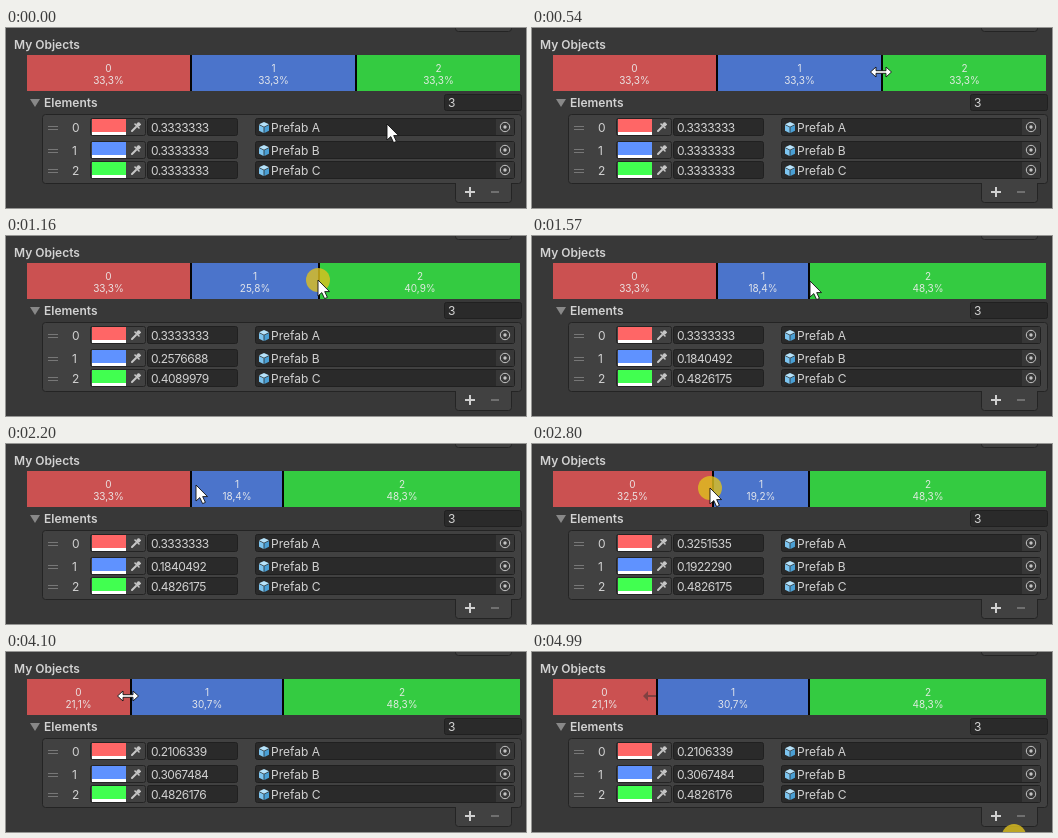
Recreate the animation shown at these times as an HTML page. Size 520x180 px, loop 5060 ms.

```html
<!DOCTYPE html>
<html lang="en">
<head>
<meta charset="utf-8">
<title>Weighted list</title>
<style>
  html, body { margin: 0; width: 100%; height: 100%; overflow: hidden; background: #383838; }
  svg { display: block; width: 520px; height: 180px; }
  text { font: 12px Inter, sans-serif; fill: #d2d2d2; white-space: pre; }
  .title { font-weight: 600; }
  .share { font-size: 10px; fill: #eee; fill-opacity: .92; text-anchor: middle; }
  .number { letter-spacing: -.5px; }
  .field { fill: #2a2a2a; stroke: #202020; }
  .panel { fill: #414141; stroke: #242424; }
  .pointer { fill: #fff; stroke: #111; stroke-width: .9; stroke-linejoin: round; }
</style>
</head>
<body>
<svg id="stage" viewBox="0 0 520 180"></svg>
<script>
const LOOP = 5060, STEP = 70;
const BAR = { left: 21, top: 27, height: 36, room: 489, gap: 2 };
const rows = [
  { y: 99, bar: '#cb5151', swatch: '#ff6666', name: 'Prefab A' },
  { y: 122, bar: '#4b74cb', swatch: '#5f92ff', name: 'Prefab B' },
  { y: 142, bar: '#34cb41', swatch: '#41ff50', name: 'Prefab C' },
];

const box = (x, y, w, h, cls, r = 2) =>
  `<rect x="${x + .5}" y="${y + .5}" width="${w - 1}" height="${h - 1}" rx="${r}" class="${cls}"/>`;
const fill = (x, y, w, h, color) =>
  `<rect x="${x}" y="${y}" width="${w}" height="${h}" fill="${color}"/>`;
const label = (x, y, value, cls = '') => `<text x="${x}" y="${y}" class="${cls}">${value}</text>`;

const segment = row => `<g class="segment">
  <rect y="${BAR.top}" height="${BAR.height}" fill="${row.bar}"/>
  <text class="share" y="44">${rows.indexOf(row)}</text>
  <text class="share" y="56"></text></g>`;

const listRow = (row, i) => {
  const top = row.y - 9;
  return fill(42, row.y - 1, 10, 1, '#777') + fill(42, row.y + 2, 10, 1, '#777')
    + label(66, row.y + 5, i)
    + box(84, top, 56, 18, 'panel')
    + fill(86, top + 1, 34, 13, row.swatch) + fill(86, top + 14, 34, 3, '#fff')
    + `<g transform="translate(130 ${row.y})" stroke="#c8c8c8" fill="#c8c8c8" stroke-linecap="round">
        <path d="M-4 4L0 0" stroke-width="2"/><path d="M-1-3L3 1" stroke-width="1.6"/>
        <circle cx="2.6" cy="-2.6" r="1.7"/></g>`
    + box(141, top, 91, 18, 'field') + label(145, row.y + 5, '', 'number weight')
    + box(249, top, 260, 18, 'field') + fill(490, top + 1, 18, 16, '#373737')
    + `<g transform="translate(258 ${row.y + .5})">
        <path d="M0-5.5L5-3.2 0-.8-5-3.2z" fill="#b5e2fa"/>
        <path d="M-5-2.6L-.4-.3V5.5L-5 3.2z" fill="#7cc4ef"/>
        <path d="M5-2.6L.4-.3V5.5L5 3.2z" fill="#4a9fd4"/></g>`
    + label(265, row.y + 5, row.name)
    + `<circle cx="499" cy="${row.y}" r="4.7" fill="none" stroke="#c4c4c4"/>
       <circle cx="499" cy="${row.y}" r="1.7" fill="#c4c4c4"/>`;
};

const stage = document.getElementById('stage');
stage.innerHTML = fill(0, 0, 520, 180, '#383838')
  + box(449, -12, 57, 16, 'panel', 3)
  + label(8, 21, 'My Objects', 'title')
  + fill(BAR.left, BAR.top, 493, BAR.height, '#050505')
  + rows.map(segment).join('')
  + '<path id="trace" d="M111 44L116 39V43H124V45H116V49z" fill="#463434" opacity=".55"/>'
  + '<path d="M24 71H34L29 79z" fill="#888"/>'
  + label(38, 79, 'Elements', 'title')
  + box(438, 66, 78, 17, 'field') + label(442, 79, '3')
  + box(449, 150, 57, 25, 'panel', 3)
  + box(36, 86, 480, 70, 'panel', 3) + fill(450, 154, 55, 3, '#414141')
  + fill(459, 163, 10, 2, '#d0d0d0') + fill(463, 159, 2, 10, '#d0d0d0')
  + fill(485, 163, 8, 2, '#707070')
  + rows.map(listRow).join('')
  + `<g id="cursor">
      <circle id="press" r="12" fill="#dec01e" opacity=".8"/>
      <path id="arrow" class="pointer" d="M0 0V16L3.8 12.6 6.6 18.6 9.4 17.4 6.7 11.6H11.5z"/>
      <path id="resize" class="pointer"
        d="M-10.5 0L-5-5V-1.3H5V-5L10.5 0 5 5V1.3H-5V5z"/></g>`;

// Each run: start time, cursor pose, then one [x, y] per step.
const onBar = (...xs) => xs.map(x => [x, 44]);
const runs = [
  [0, 'arrow', [[381, 96]]],
  [70, 'arrow', [[380, 89], [376, 68], [368, 44], [361, 29], [354, 24]]],
  [420, 'resize', [[347, 40]]],
  [540, 'resize', [[349, 44]]],
  [670, 'dragB', onBar(349, 347, 344, 341, 336, 329, 321, 312, 303, 295, 287, 280, 276)],
  [1570, 'arrow', [[278, 45], [205, 43], [139, 41], [137, 40], [139, 39], [147, 39], [160, 40], [172, 40]]],
  [2130, 'resize', [[182, 42]]],
  [2200, 'arrow', [[190, 41]]],
  [2400, 'resize', [[186, 43], [182, 44]]],
  [2730, 'dragA', onBar(182, 178, 169, 159, 150, 141)],
  [3160, 'dragA', onBar(132, 126, 123, 122)],
  [4100, 'resize', [[122, 44]]],
  [4170, 'arrow', [[270, 95], [497, 165]]],
  [4310, 'none', [[0, 0]]],
  [4580, 'arrow', [[466, 174], [457, 164], [465, 171]]],
  [4790, 'none', [[0, 0]]],
  [4990, 'click', [[482, 184]]],
];

let pulledA = 0, pulledB = 0;
const poses = runs.flatMap(([start, pose, points]) => points.map(([x, y], i) => {
  if (pose === 'dragA') pulledA = 182 - x;
  if (pose === 'dragB') pulledB = 349 - x;
  return { time: start + i * STEP, pose, x, y, a: pulledA, b: pulledB };
}));

// Last-digit rounding drift of the single-precision weights.
const drift = (a, b) => a >= 56 ? [0, -1, 0] : [a ? 1 : 0, b && !a ? 1 : 0, b ? -1 : 0];

const byId = id => document.getElementById(id);
const show = (id, on) => byId(id).style.display = on ? '' : 'none';
const segments = [...document.querySelectorAll('.segment')];
const weights = [...document.querySelectorAll('.weight')];

function draw({ time, pose, x, y, a, b }) {
  const third = BAR.room / 3;
  const error = drift(a, b);
  let left = BAR.left;
  [third - a, third + a - b, third + b].forEach((width, i) => {
    const value = width / BAR.room;
    const [rect, index, share] = segments[i].children;
    rect.setAttribute('x', left);
    rect.setAttribute('width', width);
    for (const text of [index, share]) text.setAttribute('x', left + width / 2);
    share.textContent = (value * 100).toFixed(1).replace('.', ',') + '%';
    weights[i].textContent = (value + error[i] * 1e-7).toFixed(7);
    left += width + BAR.gap;
  });
  const dragging = pose.startsWith('drag');
  show('press', dragging || pose === 'click');
  show('arrow', dragging || pose === 'arrow');
  show('resize', pose === 'resize');
  show('trace', time >= 4170);
  byId('cursor').setAttribute('transform', `translate(${x} ${y})`);
}

let current;
const origin = performance.now();
function tick() {
  const time = (performance.now() - origin) % LOOP;
  const pose = poses.findLast(p => p.time <= time) || poses[0];
  if (pose !== current) draw(current = pose);
  requestAnimationFrame(tick);
}
tick();
</script>
</body>
</html>
```
